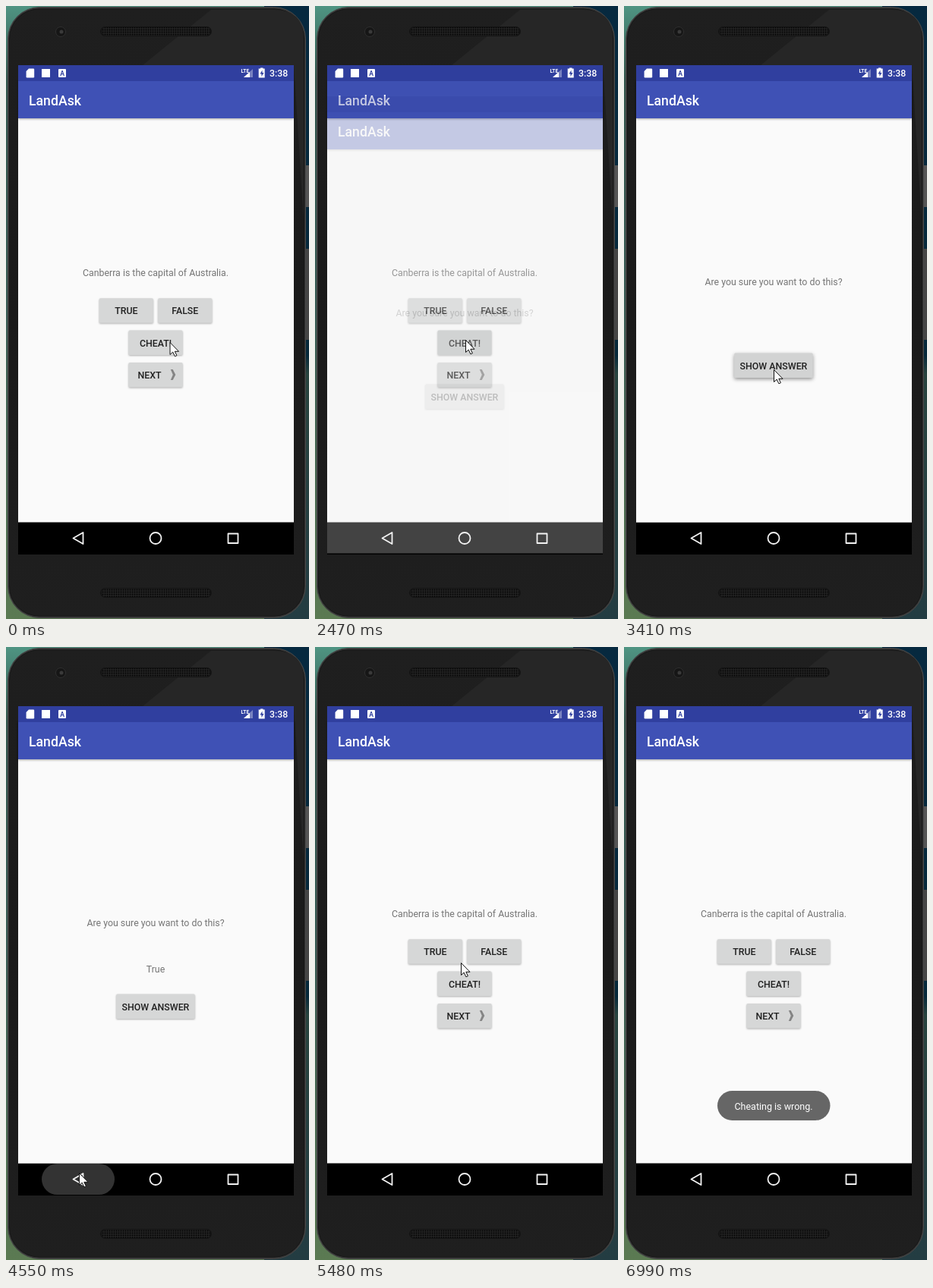
An HTML page for the animation above (7710 ms loop, 399 by 808 pixels).

```html
<!DOCTYPE html>
<html lang="en">
<head>
<meta charset="utf-8">
<title>Quiz app demo</title>
<style>
  html, body { margin: 0; width: 100%; height: 100%; overflow: hidden; background: #1b3434; }
  svg { display: block; width: 100%; height: 100%; }
  text { font-family: Roboto, sans-serif; font-size: 12.36px; }
  .title { font-size: 17.66px; font-weight: 500; fill: #fff; }
  .body { fill: #757575; text-anchor: middle; }
  .label { fill: #212121; font-weight: 500; text-anchor: middle; }
  .button rect { fill: #d6d7d7; filter: drop-shadow(0 1px 1px rgba(0,0,0,.3)); }
  .button.raised rect { fill: #d2d3d3; filter: drop-shadow(0 2px 2.5px rgba(0,0,0,.42)); }
  .button.pressed rect { fill: #c6c8c8; }
  .bar { filter: drop-shadow(0 1px 1.5px rgba(0,0,0,.35)); }
</style>
</head>
<body>
<svg id="stage" viewBox="0 0 399 808"></svg>
<script>
const LOOP = 7710;

// The picture is refreshed only at these times.
const TICKS = [0, 130, 270, 420, 560, 860, 980, 1660, 2200, 2470, 2620, 2740, 3010, 3140,
  3410, 3560, 3710, 3860, 4030, 4220, 4400, 4550, 4690, 4820, 4970, 5090, 5220, 5350, 5480,
  5600, 5750, 5900, 6170, 6290, 6420, 6560, 6700, 6840, 6990];

// Pointer waypoints: time, x, y
const POINTER = [[0, 216, 443.5], [560, 204.5, 442.5], [800, 204.5, 442.5], [980, 199.5, 440.5],
  [2100, 199.5, 440.5], [2200, 198.5, 440.5], [2900, 198.5, 440.5], [3010, 196.5, 458.5],
  [3140, 197.5, 479.5], [3710, 197.5, 479.5], [4220, 112.5, 662.5], [4400, 96.5, 693.5],
  [4820, 96.5, 693.5], [4970, 103.5, 671.5], [5480, 192.5, 416.5], [5900, 170.5, 405.5],
  [6290, 170.5, 405.5], [6840, 367.5, 762.5]];

const clamp = v => Math.max(0, Math.min(1, v));
const progress = (t, start, duration) => clamp((t - start) / duration);

const button = (id, x, y, width, label, labelX = x + width / 2) => `
  <g id="${id}" class="button">
    <rect x="${x}" y="${y}" width="${width}" height="32.5" rx="1.5"/>
    <text class="label" x="${labelX}" y="${y + 21.2}">${label}</text>
  </g>`;

const bodyText = (y, text, id = '') => `<text id="${id}" class="body" x="197" y="${y}">${text}</text>`;

const screen = content => `
  <rect x="16" y="78" width="363" height="602.5" fill="#fafafa"/>
  <rect class="bar" x="16" y="98" width="363" height="50" fill="#3f51b5"/>
  <rect x="16" y="78" width="363" height="21" fill="#303f9f"/>
  <text class="title" x="30" y="130.7">LandAsk</text>
  ${content}`;

const speaker = y => `
  <rect x="124" y="${y}" width="147" height="13" rx="6.5" fill="#141414"/>
  <rect x="126" y="${y + 1}" width="143" height="11" rx="5.5" fill="url(#mesh)"/>`;

const phone = `
  <defs>
    <linearGradient id="desk" x2="0" y2="1">
      <stop offset="0" stop-color="#4f9482"/><stop offset=".12" stop-color="#35594f"/>
      <stop offset=".5" stop-color="#3c5f58"/><stop offset="1" stop-color="#5b7a52"/>
    </linearGradient>
    <linearGradient id="deskRight" x2="0" y2="1">
      <stop offset="0" stop-color="#06293f"/><stop offset=".57" stop-color="#06283a"/>
      <stop offset=".6" stop-color="#28443f"/><stop offset="1" stop-color="#233c42"/>
    </linearGradient>
    <linearGradient id="shell" x2="0" y2="1">
      <stop offset="0" stop-color="#1f1f1f"/><stop offset=".5" stop-color="#1a1a1a"/>
      <stop offset="1" stop-color="#1f1f1f"/>
    </linearGradient>
    <pattern id="mesh" width="3" height="3" patternUnits="userSpaceOnUse">
      <rect width="3" height="3" fill="#222"/><circle cx="1.5" cy="1.5" r="1" fill="#040404"/>
    </pattern>
  </defs>
  <rect width="399" height="808" fill="url(#desk)"/>
  <rect x="340" width="59" height="808" fill="url(#deskRight)"/>
  <rect x="394" y="210" width="5" height="55" fill="#555"/>
  <rect x="394" y="320" width="5" height="120" fill="#454545"/>
  <rect x="2.5" y="1.5" width="392" height="805" rx="42" fill="#333" stroke="#484848"/>
  <rect x="4.5" y="4" width="388" height="800" rx="39" fill="url(#shell)" stroke="#161616"/>
  <path d="M270 5h83q39 0 39 38v240l-13-205H180z" fill="#262626"/>
  <circle cx="72" cy="34" r="6.5" fill="#161616" stroke="#303030"/>
  <circle cx="73" cy="34" r="2.5" fill="#3a3a3a"/>
  ${speaker(27)}${speaker(767)}
  <rect x="16" y="680" width="363" height="43" fill="#000"/>`;

const statusIcons = `
  <g fill="#fff">
    <path d="M30 82.5h6q1.2 0 1.2 1.2v9.600q0 1.2-1.2 1.2h-8.200q-1.2 0-1.2-1.2v-7.300z"/>
    <rect x="47" y="83" width="11" height="11"/>
    <rect x="69" y="83" width="10" height="11" rx="1"/>
    <text x="74" y="92" text-anchor="middle" style="font-size:8.5px;font-weight:700;fill:#303f9f">A</text>
    <text x="309.5" y="88" style="font-size:6.5px;font-weight:700">LTE</text>
    <path d="M325 83v11h-12z" opacity=".35"/>
    <path d="M321 87v7h-8z"/>
    <path d="M335 82.5v-1h3.5v1h2.2v12h-8v-12z"/>
    <path d="M337.5 84.5l-3 5h2v3.5l3-5h-2z" fill="#303f9f"/>
    <text x="347" y="93" font-weight="500">3:38</text>
  </g>`;

const navIcons = `
  <rect id="navRipple" x="47" y="681" width="96" height="41" rx="20.5" fill="#fff"/>
  <g fill="none" stroke="#f2f2f2" stroke-width="1.8" stroke-linejoin="round">
    <path d="M88.5 701.5l13-7.5v15z"/>
    <circle cx="197" cy="701.5" r="7.5"/>
    <rect x="292.5" y="695.5" width="13" height="12.5"/>
  </g>`;

document.getElementById('stage').innerHTML = `
  ${phone}
  ${screen(`
    ${bodyText(355.5, 'Canberra is the capital of Australia.')}
    ${button('trueButton', 122.8, 385.2, 71, 'TRUE')}
    ${button('falseButton', 200.3, 385.2, 71, 'FALSE')}
    ${button('cheatButton', 161.5, 427.6, 71, 'CHEAT!')}
    ${button('nextButton', 161.5, 470, 71, 'NEXT', 189)}
    <path d="M216.8 479h2.9l3.6 7-3.6 7h-2.9l3-7z" fill="#858585"/>`)}
  <rect id="dim" x="16" y="78" width="363" height="602.5"/>
  <g id="sheet">${screen(`
    ${bodyText(368, 'Are you sure you want to do this?')}
    ${bodyText(428.5, 'True', 'answer')}
    ${button('showButton', 145.2, 457.6, 103.5, 'SHOW ANSWER')}`)}
  </g>
  ${statusIcons}${navIcons}
  <g id="toast">
    <rect x="123" y="585" width="148.5" height="39" rx="19.5" fill="#666"/>
    <text x="197" y="609.5" text-anchor="middle" fill="#fff" style="font-size:12.5px">Cheating is wrong.</text>
  </g>
  <path id="pointer" d="M0 0v16l3.7-3.4 2.7 5.7 2.5-1.1-2.6-5.4h5.2z" fill="#fff" stroke="#111"/>`;

const el = id => document.getElementById(id);
const fade = (id, alpha) => el(id).setAttribute('opacity', alpha);
const move = (id, x, y) => el(id).setAttribute('transform', `translate(${x} ${y})`);

function setButton(id, raised, pressed) {
  el(id).classList.toggle('raised', raised);
  el(id).classList.toggle('pressed', pressed);
}

function pointerAt(t) {
  const next = POINTER.findIndex(p => p[0] > t);
  if (next < 0) return POINTER.at(-1).slice(1);
  const [t0, x0, y0] = POINTER[next - 1], [t1, x1, y1] = POINTER[next];
  const k = (t - t0) / (t1 - t0);
  return [x0 + (x1 - x0) * k, y0 + (y1 - y0) * k];
}

// Second screen rises and fades in, later sinks and fades out.
function sheetAt(t) {
  const travel = 51, darkest = 0.2;
  if (t < 4600) {
    const start = 2455;
    return {
      y: travel * (1 - progress(t, start, 350)) ** 5,
      alpha: 1 - (1 - progress(t, start, 200)) ** 4,
      dim: darkest * progress(t, start, 217)
    };
  }
  const start = 4771;
  return {
    y: travel * progress(t, start, 250) ** 4,
    alpha: 1 - progress(t, start + 100, 150),
    dim: darkest * (1 - progress(t, start, 250))
  };
}

function render(now) {
  const time = now % LOOP;
  const t = TICKS.findLast(tick => tick <= time);

  const sheet = sheetAt(t);
  move('sheet', 0, sheet.y);
  fade('sheet', sheet.alpha);
  fade('dim', sheet.dim);
  fade('answer', +(t >= 3560));

  setButton('cheatButton', t >= 1660 && t < 2470, t >= 2470 && t < 2740);
  setButton('showButton', t >= 3410 && t < 3710, t >= 3560 && t < 3710);
  setButton('trueButton', t === 5900, t >= 6170 && t < 6420);

  fade('navRipple', t < 4550 ? 0 : 0.2 * (1 - progress(t, 4690, 290)));
  fade('toast', 1 - (1 - progress(t, 6130, 400)) ** 2);

  move('pointer', ...pointerAt(t));
  fade('pointer', +(t < 6990));
  requestAnimationFrame(render);
}
render(0);
</script>
</body>
</html>
```
